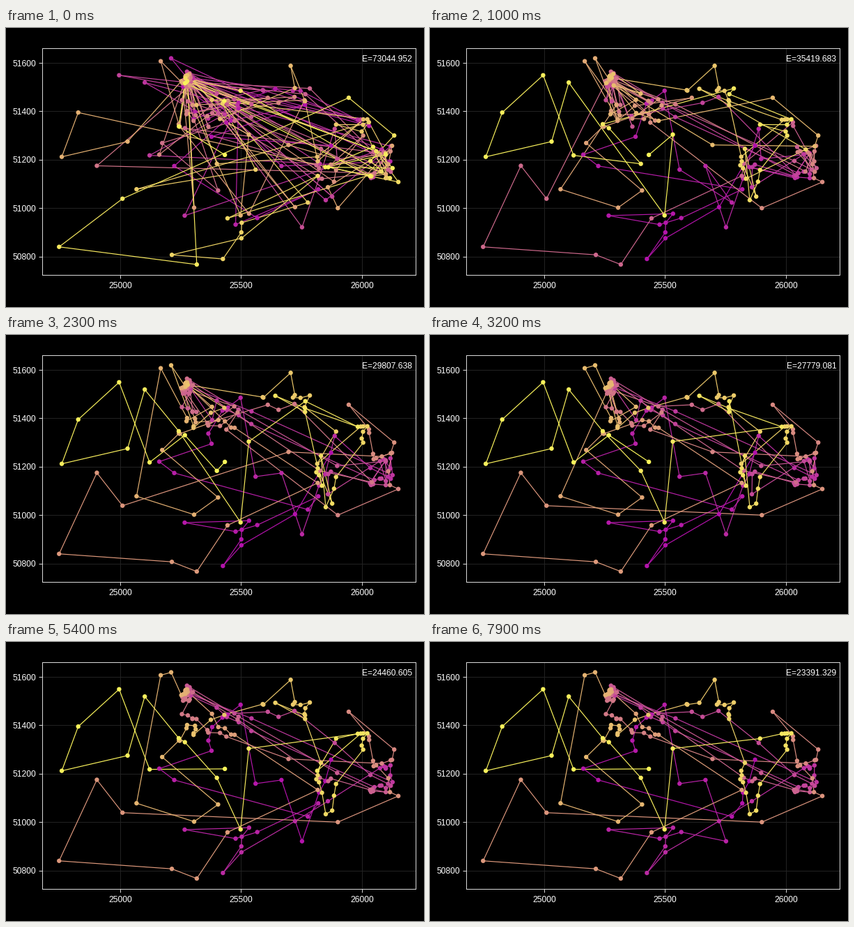
Write a matplotlib script that moves like this. It is 600 px wide and 400 px high and loops after 8000 ms.

```python
import math
import random

import matplotlib.pyplot as plt
import numpy as np
from matplotlib.animation import FuncAnimation
from matplotlib.collections import LineCollection

W, H, DPI = 600, 400, 100
FRAMES, STEP = 80, 100
PX = 72 / DPI
ORIGIN = np.array([25000, 51000])
MAGENTA = np.array([178, 16, 172]) / 255
YELLOW = np.array([250, 246, 90]) / 255

random.seed(12)
rng = np.random.default_rng(12)
plt.rcParams["font.family"] = "Liberation Sans"
plt.rcParams["font.size"] = 12 * PX

# Turning points of the cool tour, as offsets from ORIGIN.
SOUTH = [(872, 258), (776, 23), (224, 174), (162, 221), (378, 295), (498, 485),
         (560, 159), (667, 174), (752, -79), (567, -41), (267, -31), (533, -23),
         (425, -210), (723, 4)]
WEST = [(696, 261), (1133, 300), (945, 456), (1150, 108), (900, 0), (10, 39),
        (-96, 175), (-252, -160), (214, -193), (317, -233), (444, -42), (817, 133)]
NORTH = [(211, 619), (168, 607), (68, 78), (306, 2), (405, 73), (174, 269),
         (705, 588), (830, 245), (850, 33), (1022, 367), (532, 304), (498, -30),
         (400, 183), (102, 519), (31, 275), (-241, 212), (-173, 395), (-4, 549),
         (122, 218), (433, 220)]


def patch(x, y, dx, dy, n):
    """Scatter n stops evenly over a box around (x, y)."""
    return list(zip(rng.uniform(x - dx, x + dx, n), rng.uniform(y - dy, y + dy, n)))


hub = list(zip(rng.normal(278, 13, 36), rng.normal(530, 15, 36)))
east = patch(1078, 195, 52, 72, 30)
others = (
    patch(315, 415, 85, 85, 22)
    + patch(475, 395, 70, 55, 16)
    + patch(685, 460, 100, 45, 14)
    + patch(855, 125, 45, 90, 16)
    + patch(955, 340, 75, 60, 10)
    + patch(470, -70, 40, 60, 4)
)


def insert(path, stop):
    """Put a stop where it lengthens the path least."""
    p = np.array(path)
    reach = np.hypot(*(p - stop).T)
    edge = np.hypot(*np.diff(p, axis=0).T)
    path.insert(int(np.argmin(reach[:-1] + reach[1:] - edge)) + 1, stop)


route = SOUTH[:]
for k in range(0, 6, 2):
    route += east[k:k + 2] + hub[k:k + 2]
route += WEST + hub[6:8] + NORTH
for stop in hub[8:] + east[6:] + others:
    insert(route, stop)
stops = ORIGIN + np.array(route)
N = len(stops)
dist = np.hypot(*(stops[:, None] - stops[None]).transpose(2, 0, 1)).tolist()


def energy(k):
    """Cooling curve: a fast exponential drop, then a slow decline."""
    t = k * STEP / 1000
    e0, e1 = 73044.952, 35419.683
    if t < 1:
        floor = math.exp(-1 / 0.36)
        return e1 + (e0 - e1) * (math.exp(-t / 0.36) - floor) / (1 - floor)
    return float(np.interp(
        t, [1, 2.3, 3.2, 4.4, 5.4, 7.9],
        [e1, 29807.638, 27779.081, 26572.111, 24460.605, 23391.329]))


def tangle(path, size, goal, heat):
    """Lengthen the path to the goal; hotter moves reach further along it."""
    span = int(N * heat ** 2)
    for _ in range(20000):
        if size >= goal:
            break
        i = random.randrange(1, N - 2)
        j = min(N - 2, i + random.randint(1, span))
        a, b, c, d = path[i - 1], path[i], path[j], path[j + 1]
        cut = dist[a][b] + dist[c][d]
        if random.random() < 0.5:
            gain = dist[a][c] + dist[b][d] - cut
            part = path[i:j + 1][::-1]
        else:
            e = path[i + 1]
            gain = dist[a][e] + dist[c][b] + dist[b][d] - dist[b][e] - cut
            part = path[i + 1:j + 1] + [b]
        if -40 < gain < 900 * heat:
            path[i:j + 1] = part
            size += gain
    return size


def anneal():
    """Tangle the cool tour step by step, then return the steps reversed."""
    path = list(range(N))
    size = sum(dist[a][b] for a, b in zip(path, path[1:]))
    scale = size / energy(FRAMES - 1)
    tours = []
    for k in reversed(range(FRAMES)):
        size = tangle(path, size, scale * energy(k), energy(k) / energy(0))
        tours.append(path[:])
    return tours[::-1]


tours = anneal()


def shade(u):
    return MAGENTA + (YELLOW - MAGENTA) * np.asarray(u)[:, None]


fig = plt.figure(figsize=(W / DPI, H / DPI), dpi=DPI, facecolor="black")
ax = fig.add_axes([52 / W, 46 / H, 535.6 / W, 325.4 / H], facecolor="black")
ax.set_xlim(24678.24, 26220.37)
ax.set_ylim(50724.04, 51661.79)
ax.set_xticks([25000, 25500, 26000])
ax.set_yticks(range(50800, 51601, 200))
ax.tick_params(color="#d8d8d8", labelcolor="white", length=5 * PX, width=PX)
ax.tick_params(axis="x", pad=5 * PX)
ax.tick_params(axis="y", pad=3.5 * PX)
ax.grid(color="#222222", linewidth=PX)
ax.set_axisbelow(True)
for spine in ax.spines.values():
    spine.set(color="#d8d8d8", linewidth=PX)

u = np.linspace(0, 1, N)
lines = LineCollection([], colors=shade((u[:-1] + u[1:]) / 2), linewidths=1.2 * PX, zorder=2)
ax.add_collection(lines, autolim=False)
dots = ax.scatter(*stops.T, s=(6.4 * PX) ** 2, c=shade(u), linewidths=0, zorder=3)
label = fig.text(583.3 / W, 1 - 47.5 / H, "", color="white", ha="right", va="baseline")


def draw(k):
    p = stops[tours[k]]
    lines.set_segments(np.stack([p[:-1], p[1:]], axis=1))
    dots.set_offsets(p)
    label.set_text(f"E={energy(k):.3f}")
    return lines, dots, label


anim = FuncAnimation(fig, draw, frames=FRAMES, interval=STEP, repeat=True, repeat_delay=0)
plt.show()
```
